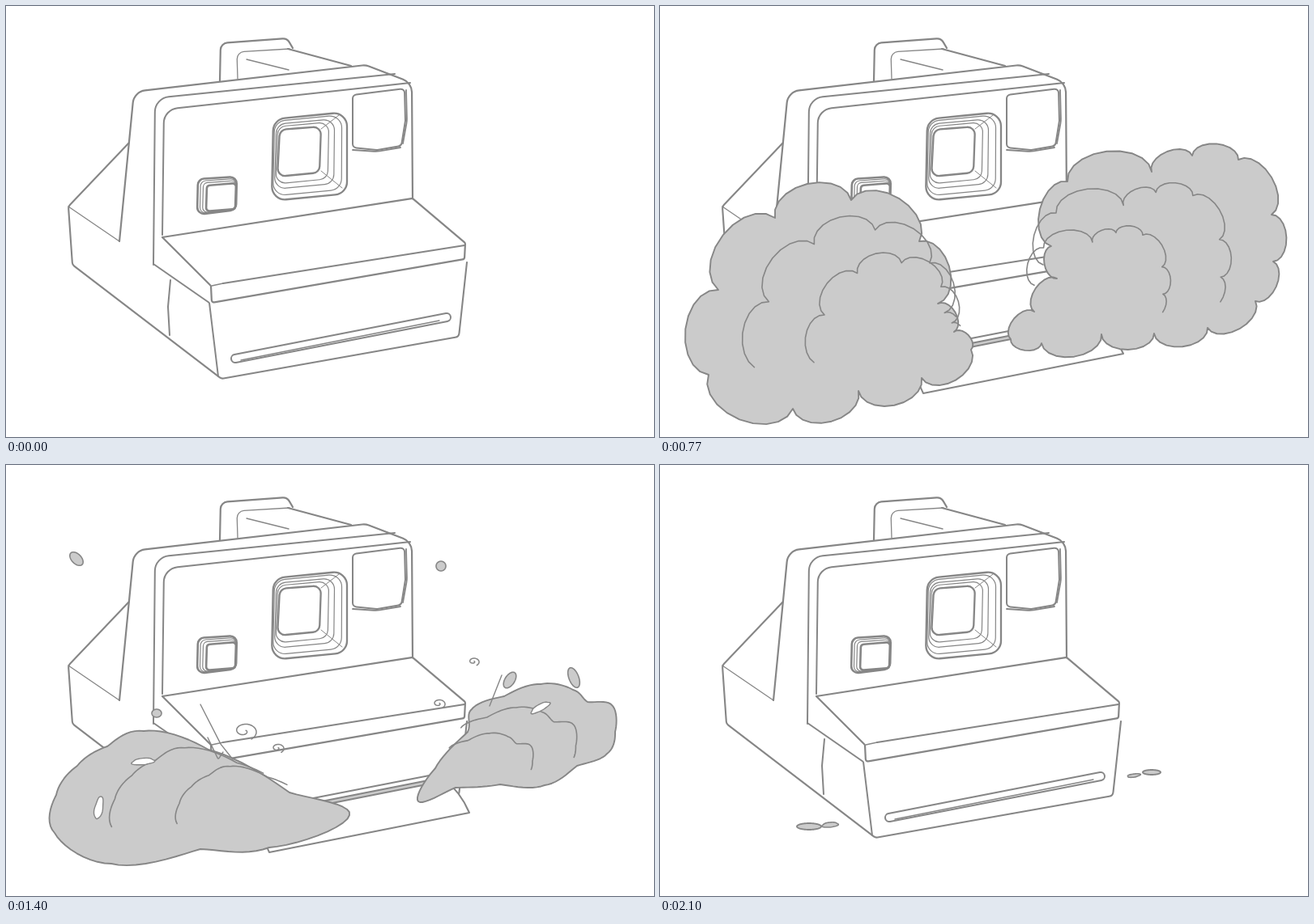
Recreate the animation shown at these times as an HTML page with a canvas. Size 800 by 533 pixels, loop 2170 ms.

```html
<!DOCTYPE html>
<html>
<head>
<meta charset="utf-8">
<style>
html, body { margin: 0; width: 100%; height: 100%; overflow: hidden; background: #fff; }
canvas { display: block; width: 800px; height: 533px; }
</style>
</head>
<body>
<canvas id="stage" width="800" height="533"></canvas>
<script>
const ctx = document.getElementById('stage').getContext('2d');
const STEP = 70, COUNT = 31;
const INK = '#868686', SMOKE = '#cbcbcb', PAPER = '#fff';
const clamp = v => Math.min(1, Math.max(0, v));
const mix = (a, b, u) => a + (b - a) * u;
const mixPoint = (p, q, u) => [mix(p[0], q[0], u), mix(p[1], q[1], u)];
const mixPath = (a, b, u) => a.map((p, k) => mixPoint(p, b[k], u));
const points = s => s.split(' ').map(p => p.split(',').map(Number));

function paint(fill, width) {
  if (fill) { ctx.fillStyle = fill; ctx.fill(); }
  ctx.lineWidth = width;
  ctx.stroke();
}

function draw(path, width, fill) {
  ctx.beginPath();
  path.forEach(p => ctx.lineTo(...p));
  if (fill) ctx.closePath();
  paint(fill, width);
}

// Polyline with rounded corners
function rounded(p, r, width, closed) {
  const path = closed ? [mixPoint(p[0], p[1], 0.5), ...p.slice(1), p[0], mixPoint(p[0], p[1], 0.5)] : p;
  ctx.beginPath();
  ctx.moveTo(...path[0]);
  for (let k = 1; k < path.length - 1; k++) ctx.arcTo(...path[k], ...path[k + 1], r);
  ctx.lineTo(...path[path.length - 1]);
  paint(null, width);
}

const lines = (s, r, width) => s.split('/').forEach(run => rounded(points(run), r, width));

// Nested frames between an inner and an outer quad
function frames(inner, outer, levels, rIn, rOut, bold) {
  const a = points(inner), b = points(outer);
  for (const u of [0, ...levels, 1])
    rounded(mixPath(a, b, u), mix(rIn, rOut, u), u % 1 ? 1.2 : bold, true);
}

function capsule(from, to, size, fill) {
  for (const [width, color] of [[size + 2, INK], [size - 2, fill]]) {
    ctx.beginPath();
    ctx.moveTo(...from);
    ctx.lineTo(...to);
    ctx.strokeStyle = color;
    ctx.lineWidth = width;
    ctx.stroke();
  }
  ctx.strokeStyle = INK;
}

function camera() {
  lines('264,93 265,46 347,40 354,52/348,53 426,74', 9, 2.2);
  lines('152,169 77,248 82,320 266,461 559,409 569,317', 6, 2.1);
  lines('140,291 158,106 444,73 501,95 502,238', 17, 2.2);
  lines('182,320 184,114 480,84/193,283 195,128 499,95', 19, 2);
  lines('193,286 502,238 567,293 566,313 254,367 253,346 193,286/268,343 566,296', 3, 2.2);
  lines('182,319 251,367 262,458/203,339 200,372 202,407', 2, 2);
  lines('286,90 285,57 350,53/297,66 349,79/77,248 140,291/254,346 268,343', 9, 1.3);
  frames('338,153 389,149 387,206 335,211', '330,140 421,131 421,232 328,241', [0.3, 0.52, 0.8], 9, 16, 2.3);
  lines('389,152 411,135/389,204 415,225', 1, 1);
  frames('248,222 284,219 283,251 247,254', '237,214 285,211 284,252 236,258', [0.4, 0.7], 4, 8, 2.6);
  rounded(points('428,110 492,102 493,142 488,173 458,178 428,175'), 5, 2, true);
  lines('494,104 495,142 490,170/428,178 458,180 487,175', 30, 1.8);
  capsule([283, 436], [544, 385], 10, PAPER);
  lines('290,438 535,389', 1, 1.3);
}

function paper(p) {
  if (p <= 0) return;
  const edge = (x, y, method) => {
    if (method === 'in') {
      ctx.moveTo(x, y);
      ctx.quadraticCurveTo(x + 20 * p, y + 17 * p, x + 29 * p, y + 41 * p);
    } else {
      ctx.lineTo(x + 31 * p, y + 41 * p);
      ctx.quadraticCurveTo(x + 20 * p, y + 15 * p, x, y);
    }
  };
  ctx.beginPath();
  edge(296, 438, 'in');
  edge(541, 389, 'out');
  paint(PAPER, 2.1);
  capsule([300, 436], [533, 390], 4.5, SMOKE);
}

// Lumpy ellipse; the seed shifts its bumps
function blob(x, y, rx, ry, tilt, lump, seed = 0) {
  return Array.from({ length: 48 }, (_, k) => {
    const a = k / 48 * 2 * Math.PI;
    const r = 1 + lump * (Math.sin(3 * a + seed * 2.4) + 0.6 * Math.sin(5 * a + seed));
    const u = rx * r * Math.cos(a), v = ry * r * Math.sin(a);
    return [x + u * Math.cos(tilt) - v * Math.sin(tilt), y + u * Math.sin(tilt) + v * Math.cos(tilt)];
  });
}

// Key points go clockwise from the nozzle; puff is the height of each lobe
function makeCloud({ start, end, turn, poses, ...rest }) {
  const keys = poses.map(([at, puff, s]) => ({ at, puff, path: points(s) }));
  const oval = ([x, y, rx, ry]) => keys[0].path.map((_, k, all) => {
    const a = turn + k / all.length * 2 * Math.PI;
    return [x + rx * Math.cos(a), y + ry * Math.sin(a)];
  });
  return { ...rest, keys: [{ at: 3, puff: 0.33, path: oval(start) }, ...keys, { at: 30, puff: 0, path: oval(end) }] };
}

const clouds = [
  makeCloud({
    start: [290, 436, 8, 4], end: [184, 447, 15, 4], turn: 0, folds: [0.37, 0.86],
    holes: [[0.3, 0.23, 14, 4, -0.1], [0.15, 0.58, 5, 14, 0.2]],
    poses: [
      [7, 0.33, '303,434 285,455 262,459 238,449 218,417 204,377 235,336 298,334 317,368 300,394 303,415'],
      [11, 0.33, '384,425 323,460 245,476 164,498 60,456 72,351 142,262 236,240 320,291 343,368 363,403'],
      [15, 0.06, '393,420 320,466 180,495 75,487 40,420 60,350 85,310 155,290 240,298 320,342 365,398'],
      [20, 0.04, '424,433 325,473 240,475 130,493 60,455 62,408 88,372 125,348 170,329 250,352 350,405'],
      [26, 0.02, '369,441 300,453 200,470 172,457 130,473 93,460 110,433 155,425 185,421 240,436 330,438']
    ]
  }),
  makeCloud({
    start: [543, 388, 8, 4], end: [607, 380, 11, 3], turn: Math.PI, folds: [0.2, 0.64],
    holes: [[0.62, 0.2, 13, 4, -0.5]],
    poses: [
      [7, 0.33, '520,388 521,374 520,360 511,324 549,299 595,311 631,329 619,370 577,379 578,391 568,397 556,396 545,399 532,391 526,389'],
      [11, 0.3, '433,412 462,378 490,337 483,297 503,217 607,205 657,185 714,190 755,258 757,316 735,365 676,398 610,405 545,406 471,417'],
      [15, 0.06, '537,393 505,371 525,340 533,295 565,240 613,210 680,201 735,194 788,232 785,290 785,335 765,397 700,402 650,411 580,396'],
      [20, 0.04, '509,416 530,375 570,330 575,302 615,286 660,271 700,278 718,293 748,297 752,330 742,357 705,372 665,396 610,395 555,399'],
      [26, 0.02, '531,403 540,398 570,385 611,367 622,350 655,342 674,353 695,352 712,363 706,377 680,389 645,391 615,395 580,396 545,409']
    ]
  })
];

// Blends a smooth curve through the points with a row of half-oval lobes
function outline(p, puff) {
  const out = [], n = p.length, soft = 1 - clamp(puff / 0.3);
  p.forEach((b, k) => {
    const a = p[(k + n - 1) % n], c = p[(k + 1) % n], d = p[(k + 2) % n];
    const normal = [c[1] - b[1], b[0] - c[0]];
    for (let t = 0; t < 1; t += 0.1) {
      const along = (1 - Math.cos(Math.PI * t)) / 2, lift = puff * Math.sin(Math.PI * t);
      out.push([0, 1].map(m => {
        const curve = b[m] + t / 2 * (c[m] - a[m] +
          t * (2 * a[m] - 5 * b[m] + 4 * c[m] - d[m] + t * (3 * b[m] - a[m] - 3 * c[m] + d[m])));
        return mix(mix(b[m], c[m], along), curve, soft) + normal[m] * lift;
      }));
    }
  });
  return out;
}

function poseAt({ keys }, i) {
  const k = Math.max(1, keys.findIndex(q => q.at >= i)), a = keys[k - 1], b = keys[k];
  const u = clamp((i - a.at) / (b.at - a.at));
  return { path: mixPath(a.path, b.path, u), puff: mix(a.puff, b.puff, u) };
}

function drawCloud(cloud, i) {
  if (i <= 3) return;
  const { path, puff } = poseAt(cloud, i), edge = outline(path, puff);
  draw(edge, 1.9, SMOKE);
  if (i < 6 || i > 23) return;
  // Inner folds echo the far edge, shrunk towards the nozzle
  const far = edge.slice(...cloud.folds.map(f => Math.round(f * edge.length)));
  for (const size of [0.8, 0.58]) draw(far.map(p => mixPoint(path[0], p, size)), 1.6);
  if (i < 13) return;
  const x = path.map(p => p[0]), y = path.map(p => p[1]);
  for (const [u, v, ...shape] of cloud.holes)
    draw(blob(mix(Math.min(...x), Math.max(...x), u), mix(Math.min(...y), Math.max(...y), v), ...shape, 0.06), 1.4, PAPER);
}

// Strands stretch between the two clouds as they part
function strands(i) {
  if (i < 14 || i > 16) return;
  const [a, b] = clouds.map(c => poseAt(c, i).path[0]);
  for (const bow of [-4, 9, 22]) {
    const strand = Array.from({ length: 21 }, (_, k) => {
      const t = k / 20, p = mixPoint([a[0] - 15, a[1] - 3], [b[0] + 15, b[1] - 6], t);
      return [p[0], p[1] + bow * Math.sin(Math.PI * t) - 4 * Math.sin(2 * Math.PI * t)];
    });
    ctx.strokeStyle = INK;
    draw(strand, 9);
    ctx.strokeStyle = SMOKE;
    draw(strand, 6);
  }
  ctx.strokeStyle = INK;
}

// Flying bits: x, y, radii, tilt at the moment they are largest
const bits = [
  { at: 15, life: 3, lump: 0.11, list: [
    [175, 200, 64, 13, 0.7], [277, 215, 47, 27, 0.9], [347, 272, 27, 34, 0.1], [40, 304, 12, 23, -0.15],
    [550, 184, 43, 29, -0.3], [616, 156, 22, 8, -0.75], [694, 148, 17, 10, 0.7], [748, 143, 34, 31, 0]] },
  { at: 20, life: 3, lump: 0, list: [
    [87, 116, 10, 6, 0.8], [537, 125, 6, 6, 0], [186, 307, 6, 5, 0], [622, 266, 11, 6, -1], [701, 263, 13, 6, 1.2]] },
  { at: 30, life: 2, lump: 0.05, list: [[210, 445, 10, 3, -0.1], [585, 384, 8, 2, -0.15]] }
];

function drawBits(i) {
  for (const { at, life, lump, list } of bits) {
    const d = i - at, size = 1 - 0.2 * Math.abs(d);
    if (Math.abs(d) > life) continue;
    list.forEach(([x, y, rx, ry, tilt], seed) => {
      const dx = (x - (x < 400 ? 300 : 540)) * 0.05 * d, dy = (y - 410) * 0.05 * d;
      draw(blob(x + dx, y + dy, rx * size, ry * size, tilt, lump, seed), 1.6, SMOKE);
    });
  }
}

function swirls(i) {
  if (Math.abs(i - 20) > 1) return;
  for (const [x, y, r] of [[294, 329, 15], [335, 350, 8], [577, 243, 7], [534, 295, 8]]) {
    const curl = [];
    for (let a = -1; a < 7; a += 0.25)
      curl.push([x + r * Math.cos(a) * (1 - a / 8), y - r * 0.7 * Math.sin(a) * (1 - a / 8)]);
    draw(curl, 1.5);
  }
  lines('240,296 265,345 280,364/249,337 262,364 268,355/612,260 597,298', 1, 1.4);
}

function frame() {
  const i = Math.floor(performance.now() / STEP) % COUNT;
  ctx.fillStyle = PAPER;
  ctx.fillRect(0, 0, 800, 533);
  ctx.lineJoin = ctx.lineCap = 'round';
  ctx.strokeStyle = INK;
  camera();
  paper(Math.min(clamp(i / 5), clamp((30 - i) / 3)));
  strands(i);
  clouds.forEach(c => drawCloud(c, i));
  drawBits(i);
  swirls(i);
  requestAnimationFrame(frame);
}
frame();
</script>
</body>
</html>
```
